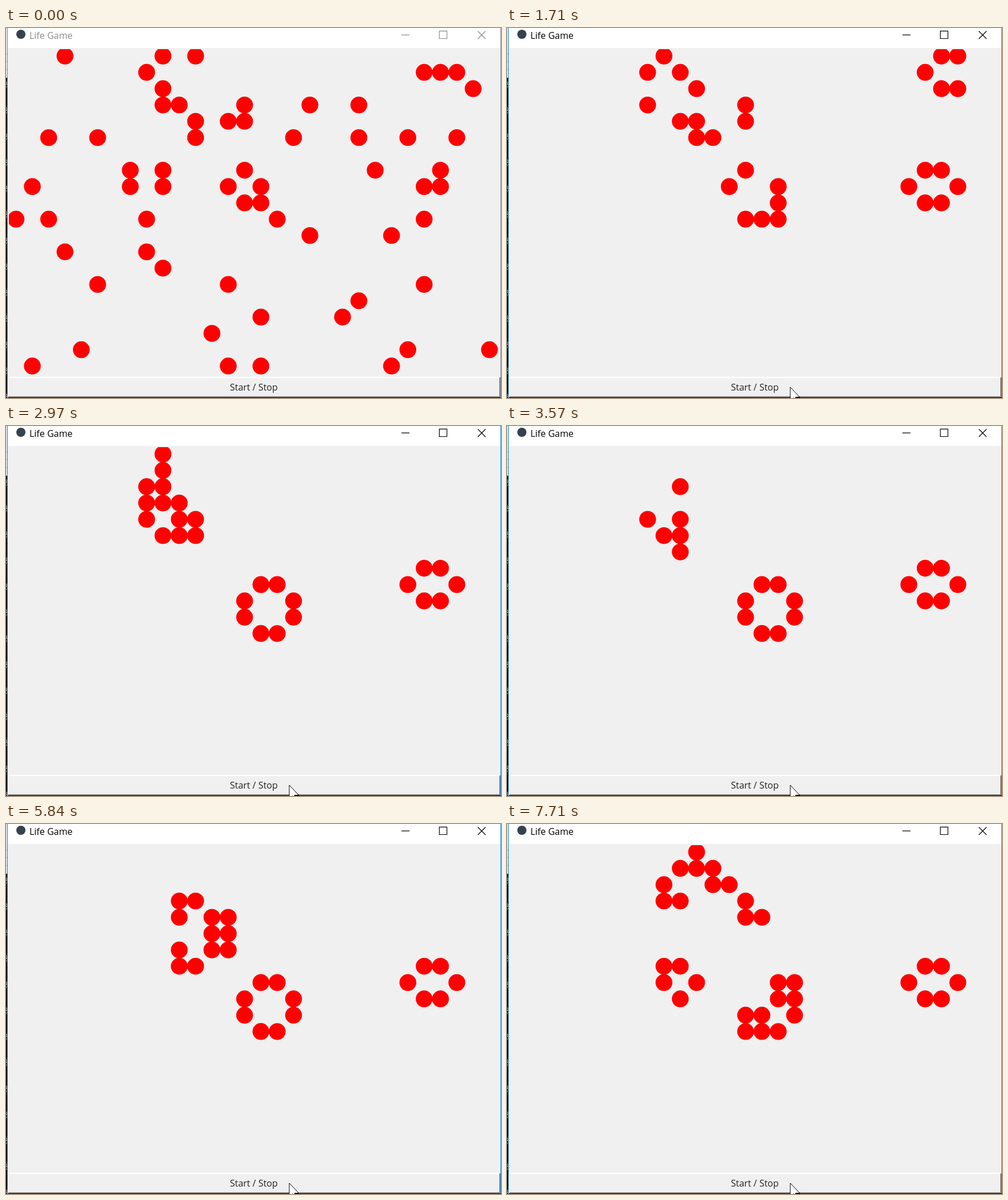
An HTML page that plays this animation: 865 by 647 pixels, repeating every 8000 ms.

```html
<!DOCTYPE html>
<html lang="en">
<head>
<meta charset="utf-8">
<title>Life Game</title>
<style>
  html, body { margin: 0; width: 100%; height: 100%; overflow: hidden; }
  svg { display: block; width: 100%; height: 100%; --ink: #8c8c8c; --edge: #8a8a8a; --side: #e4e6ea; }
  svg.active { --ink: #000; --edge: #1c8ad6; --side: #dbe6f2; }
  text { font-family: "Open Sans", "Noto Sans", sans-serif; font-size: 16px; }
  .crisp { shape-rendering: crispEdges; }
</style>
</head>
<body>
<svg id="stage" viewBox="0 0 865 647">
  <!-- desktop showing beside the window -->
  <g class="crisp">
    <rect width="865" height="647" fill="#050505"/>
    <rect width="865" height="87" fill="var(--side)"/>
    <path d="M0 45.5h3M0 58.5h3M0 72.5h3" stroke="#a9b2bd"/>
  </g>
  <path id="specks" fill="none" stroke="#b8b8b8"/>

  <!-- window -->
  <g class="crisp">
    <rect x="2" width="863" height="646" fill="var(--edge)"/>
    <rect x="3" width="861" height="35" fill="#fff"/>
    <rect x="3" y="35" width="861" height="611" fill="#f0f0f0"/>
  </g>
  <circle cx="26" cy="11" r="8" fill="#34424f"/>
  <text x="41" y="19" fill="var(--ink)">Life Game</text>
  <g fill="none" stroke="var(--ink)" stroke-width="1.2">
    <path d="M691 12.2h14M757.3 5.3h13.2v13.2h-13.2z"/>
    <path d="M824.5 5.5l13.5 13.5M838 5.5l-13.5 13.5"/>
  </g>

  <clipPath id="board"><rect x="5" y="37" width="857" height="571"/></clipPath>
  <g clip-path="url(#board)"><path id="cells" fill="#f00"/></g>

  <!-- button -->
  <g class="crisp" fill="none" stroke-width="2">
    <path id="light" d="M4 645V610.5H863"/>
    <path id="dark" d="M4 645H862.5V611"/>
  </g>
  <text id="label" x="433" y="634" text-anchor="middle" fill="#222">Start / Stop</text>

  <path id="cursor" d="M0 0V24L5.5 18.5L9 27L12.5 25.5L9 17.5H16.5Z" fill="#fff" stroke="#000"/>
</svg>
<script>
const COLS = 30, PITCH = 28.53, RADIUS = 14.7, LOOP = 8000;
const ENTER = 490, ARRIVE = 900, PRESS = 1020, RELEASE = 1110;
const FIRST_STEP = 1350, STEP = 315;

// starting cells: the columns alive in each row
const seed = [
  [3, 9, 11], [8, 25, 26, 27], [9, 28], [9, 10, 14, 18, 21], [11, 13, 14],
  [2, 5, 11, 17, 21, 24, 27], [], [7, 9, 14, 22, 26], [1, 7, 9, 13, 15, 25, 26], [14, 15],
  [0, 2, 8, 16, 25], [18, 23], [3, 8], [9], [5, 13, 25],
  [21], [15, 20], [12], [4, 24, 29], [1, 13, 15, 23]
];

const el = id => document.getElementById(id);
const ring = (x, y, r) => `M${x - r} ${y}a${r} ${r} 0 1 0 ${2 * r} 0a${r} ${r} 0 1 0 ${-2 * r} 0`;

function neighbours(grid, r, c) {
  let n = 0;
  for (let y = r - 1; y <= r + 1; y++)
    for (let x = c - 1; x <= c + 1; x++)
      if ((y !== r || x !== c) && grid[y]?.[x]) n++;
  return n;
}

const evolve = grid => grid.map((row, r) => row.map((alive, c) => {
  const n = neighbours(grid, r, c);
  return n === 3 || (alive && n === 2);
}));

const outline = grid => grid.flatMap((row, r) => row.map((alive, c) =>
  alive ? ring(17.5 + c * PITCH, 49 + r * PITCH, RADIUS) : "")).join("");

let grid = seed.map(row => Array.from({ length: COLS }, (_, c) => row.includes(c)));
const shapes = [outline(grid)];
for (let t = FIRST_STEP; t < LOOP; t += STEP) shapes.push(outline(grid = evolve(grid)));

let specks = "";
for (let y = 98; y < 647; y += 45.5) specks += ring(0, y - 2, 2) + ring(0, y + 3, 2.5);
el("specks").setAttribute("d", specks);

let shown = -1;
function draw(now) {
  const t = now % LOOP;
  const generation = Math.max(0, Math.floor((t - FIRST_STEP) / STEP) + 1);
  if (generation !== shown) el("cells").setAttribute("d", shapes[shown = generation]);

  el("stage").classList.toggle("active", t >= PRESS);
  const pressed = t >= PRESS && t < RELEASE;
  el("light").setAttribute("stroke", pressed ? "#808080" : "#fff");
  el("dark").setAttribute("stroke", pressed ? "#fff" : "#808080");
  el("label").setAttribute("transform", pressed ? "translate(1 1)" : "");

  const p = Math.min(1, Math.max(0, (t - ENTER) / (ARRIVE - ENTER)));
  const left = (1 - p) ** 2;
  el("cursor").setAttribute("transform", `translate(${495 + 60 * left} ${628 + 24 * left})`);
  requestAnimationFrame(draw);
}
draw(0);
</script>
</body>
</html>
```
